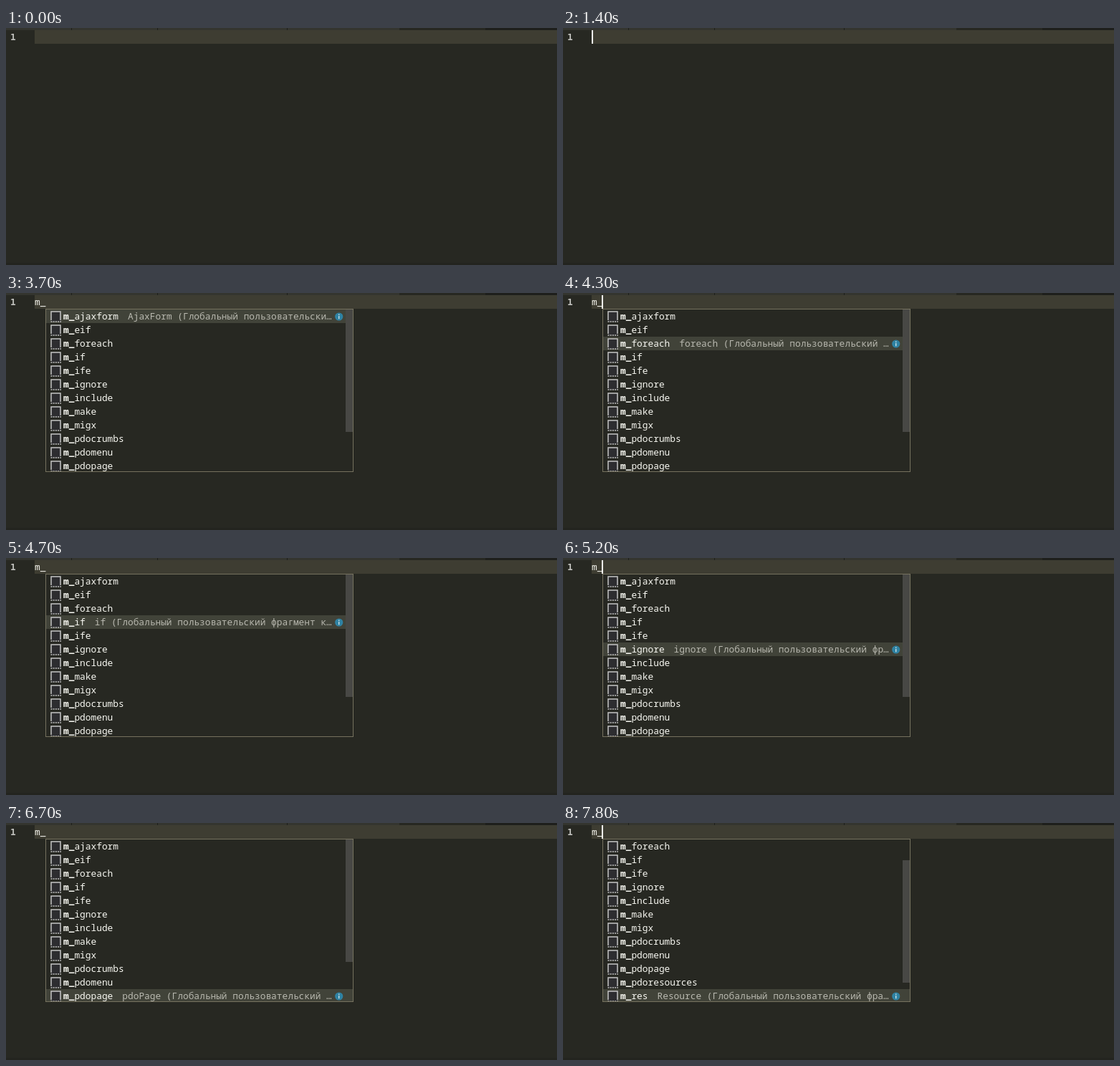
An HTML page that plays this animation: 769x331 px, repeating every 8 s.

```html
<!DOCTYPE html>
<html lang="ru">
<head>
<meta charset="utf-8">
<title>Snippet suggestions</title>
<style>
  html, body { margin: 0; width: 100%; height: 100%; overflow: hidden; background: #272822; }
  body {
    position: relative;
    font: 12.83px/18px "Noto Sans Mono", "DejaVu Sans Mono", monospace;
    color: #f8f8f2;
    white-space: pre;
  }
  div, svg { position: absolute; }
  #tabs { left: 0; top: 0; width: 769px; height: 3px; background: #1e1f1c; }
  #tabs div { top: 0; height: 3px; background: #34352f; }
  #tabs .active { background: #272822; }
  #line { left: 40px; top: 3px; width: 729px; height: 19px; background: #3e3d32; }
  #number { left: 6px; top: 4px; font: bold 12.79px/18px "DejaVu Sans Mono", monospace; color: #c2c2bf; }
  #typed { left: 40px; top: 3px; }
  #cursor { top: 3px; width: 2px; height: 19px; background: #f8f8f0; }
  #foot { left: 0; top: 328px; width: 769px; height: 3px; background: #23241f; }
  #popup {
    top: 22px; width: 428px; height: 226px; overflow: hidden;
    border: 1px solid #75715e; background: #272822;
  }
  #list { left: 0; top: 0; width: 428px; }
  .row { left: 0; width: 428px; height: 19px; }
  .row.on { background: #414339; }
  .icon { left: 6px; top: 2px; }
  .label { left: 24px; top: 0; font-weight: 500; }
  .detail {
    top: 0; overflow: hidden; text-overflow: ellipsis; color: #b9b9b0;
  }
  .info { left: 403px; top: 4px; }
  .row:not(.on) .detail, .row:not(.on) .info { display: none; }
  #thumb { left: 418px; width: 10px; background: #484845; }
</style>
</head>
<body>
<div id="tabs"></div>
<div id="line"></div>
<div id="number">1</div>
<div id="typed"></div>
<div id="foot"></div>
<div id="popup"><div id="list"></div><div id="thumb"></div></div>
<div id="cursor"></div>
<script>
const LOOP = 8000, ROW = 19, CHAR = 7.7;
const $ = id => document.getElementById(id);

// Label suffix and title of each snippet
const items = [
  ['ajaxform', 'AjaxForm'], ['eif', 'eif'], ['foreach', 'foreach'], ['if', 'if'],
  ['ife', 'ife'], ['ignore', 'ignore'], ['include', 'include'], ['make', 'make'],
  ['migx', 'MIGX'], ['pdocrumbs', 'pdoCrumbs'], ['pdomenu', 'pdoMenu'],
  ['pdopage', 'pdoPage'], ['pdoresources', 'pdoResources'], ['res', 'Resource']
];

const icon = `<svg class="icon" width="16" height="17">
  <path d="M1 1h13v14h-13z" fill="#2d2d30"/>
  <path d="M1 13V1H14V13" fill="none" stroke="#c5c5c5" stroke-width="1.5"/>
  <path d="M0.5 15H15" stroke="#c5c5c5" stroke-width="1.5" stroke-dasharray="2 1.2"/></svg>`;
const info = `<svg class="info" width="12" height="12">
  <circle cx="5.7" cy="6" r="5.6" fill="#2f82a3"/>
  <path d="M5.7 2.6v1.4M5.7 5v4.3" stroke="#d5e6ea" stroke-width="1.3"/></svg>`;

// Times at which each property changes: [ms, value]
const tracks = {
  typed: [[0, ''], [1700, 'm'], [2300, 'm_']],
  thumb: [[0, 88], [2400, 171]],
  selected: [[0, 0], [3900, 1], [4300, 2], [4700, 3], [4900, 4], [5200, 5], [5600, 6],
    [5800, 7], [6000, 8], [6200, 9], [6400, 10], [6700, 11], [7100, 12], [7600, 13]]
};
const blinks = [500, 1000, 1400, 2100, 2300, 2800, 3300, 3700, 4200, 4600, 5100, 5500,
  6000, 6400, 6900, 7400, 7800];

const valueAt = (track, t) => track.filter(k => k[0] <= t).pop()[1];

[[0, 91], [92, 211], [212, 392], [393, 549], [549, 669]].forEach(([a, b], i) => {
  const tab = document.createElement('div');
  tab.style.left = a + 'px';
  tab.style.width = b - a + 'px';
  if (i === 4) tab.className = 'active';
  $('tabs').append(tab);
});

const rows = items.map(([name, title], i) => {
  const row = document.createElement('div');
  const start = 24 + CHAR * (name.length + 2) + 13;
  row.className = 'row';
  row.style.top = i * ROW + 'px';
  row.innerHTML = `${icon}<div class="label"><b>m</b><span class="mark">_</span>${name}</div>` +
    `<div class="detail" style="left:${start}px;width:${402.5 - start}px">` +
    `${title} (Глобальный пользовательский фрагмент кода)</div>${info}`;
  $('list').append(row);
  return row;
});
const marks = document.querySelectorAll('.mark');

function draw(t) {
  const typed = valueAt(tracks.typed, t);
  const selected = valueAt(tracks.selected, t);
  const n = typed.length;
  const scroll = Math.max(0, selected - 11) * ROW;

  $('typed').textContent = typed;
  $('cursor').style.left = 40 + 7 * n + 'px';
  $('cursor').style.visibility = blinks.filter(b => b <= t).length % 2 ? 'visible' : 'hidden';

  $('popup').style.visibility = n ? 'visible' : 'hidden';
  $('popup').style.left = 41 + 7 * n + 'px';
  $('list').style.top = -scroll + 'px';
  $('thumb').style.top = Math.round(scroll * 0.76) + 'px';
  $('thumb').style.height = valueAt(tracks.thumb, t) + 'px';
  rows.forEach((row, i) => row.classList.toggle('on', i === selected));
  marks.forEach(m => m.style.fontWeight = n > 1 ? 700 : 500);
}

const begin = performance.now();
function tick() {
  draw((performance.now() - begin) % LOOP);
  requestAnimationFrame(tick);
}
tick();
</script>
</body>
</html>
```
